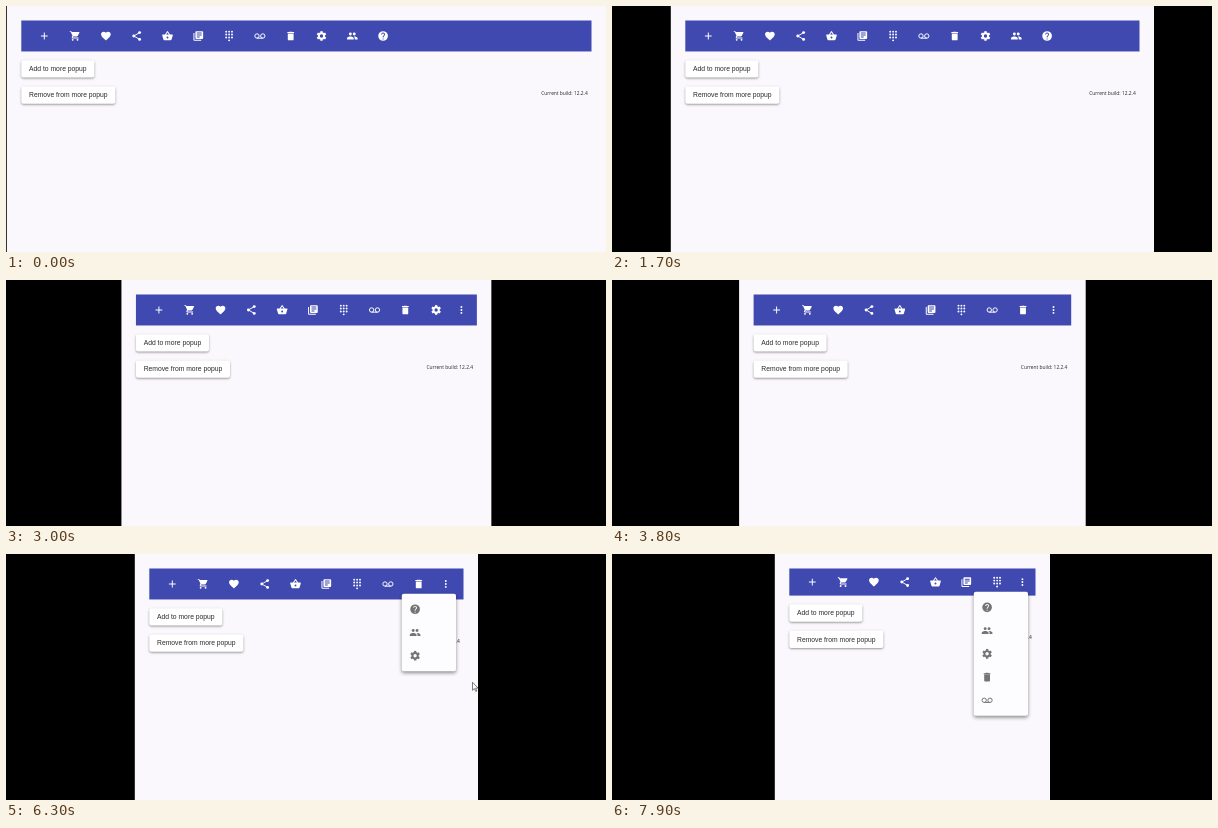
An HTML page with a canvas for the animation above (8000 ms loop, 600 px wide and 246 px high).

```html
<!DOCTYPE html>
<html lang="en">
<head>
<meta charset="utf-8">
<title>Responsive toolbar</title>
<style>
html, body { margin: 0; width: 600px; height: 246px; overflow: hidden; background: #000; }
canvas { display: block; width: 600px; height: 246px; }
</style>
</head>
<body>
<canvas id="stage"></canvas>
<script>
const W = 600, H = 246, LOOP = 8000, STEP = 100;
const S = 0.484;            // CSS pixel to stage pixel
const GAP = 30.8;           // distance between toolbar icons
const dpr = window.devicePixelRatio || 1;
const canvas = document.getElementById('stage');
canvas.width = W * dpr;
canvas.height = H * dpr;
const ctx = canvas.getContext('2d');

// time, inset of the window on each side
const INSET = [[800, 0], [1700, 58], [2500, 105], [2600, 106.5], [3200, 118.7], [3500, 118.7],
  [3800, 126.3], [4000, 128], [6900, 128], [7200, 138.4], [7800, 156.5], [7900, 162]];
// time, pointer tip
const POINTER_X = [[4200, 463], [4700, 439], [5100, 437.5], [6000, 465], [6300, 466.5], [6500, 472]];
const POINTER_Y = [[4200, 118], [4700, 33], [5100, 31.5], [6000, 128], [6500, 128.5]];

function track(keys, t) {
  if (t <= keys[0][0]) return keys[0][1];
  for (let i = 1; i < keys.length; i++) {
    const [t0, a] = keys[i - 1], [t1, b] = keys[i];
    if (t <= t1) return a + (b - a) * (t - t0) / (t1 - t0);
  }
  return keys[keys.length - 1][1];
}

const path = d => {
  const p = new Path2D(d);
  return () => ctx.fill(p, 'evenodd');
};

function dot(x, y, r) {
  ctx.beginPath();
  ctx.arc(x, y, r, 0, Math.PI * 2);
  ctx.fill();
}

function ring(x, y, r, width) {
  ctx.lineWidth = width;
  ctx.beginPath();
  ctx.arc(x, y, r, 0, Math.PI * 2);
  ctx.stroke();
}

// Icons live on a 24 x 24 grid.
const add = path('M19 13h-6v6h-2v-6H5v-2h6V5h2v6h6z');
const heart = path('M12 21.3 10.5 20C5.4 15.4 2 12.3 2 8.5 2 5.4 4.4 3 7.5 3 9.2 3 10.9 3.8 12 5.1 13.1 3.8 14.8 3 16.5 3 19.6 3 22 5.4 22 8.5c0 3.8-3.4 6.9-8.5 11.5z');
const basket = path('M17.2 9 12.8 2.4q-.8-.9-1.6 0L6.8 9H2q-1.2.1-1 1.3l2.6 9.2Q4 21 5.5 21h13q1.5 0 1.9-1.5L23 10.3Q23.2 9.1 22 9zM9 9l3-4.4L15 9zM12 13a2 2 0 1 0 0 4 2 2 0 0 0 0-4z');
const books = path('M4 6H2v14q0 2 2 2h14v-2H4zM20 2H8Q6 2 6 4v12q0 2 2 2h12q2 0 2-2V4q0-2-2-2zM19 11H9V9h10zM15 15H9v-2h6zM19 7H9V5h10z');
const bin = path('M6 19q0 2 2 2h8q2 0 2-2V7H6zM19 4h-3.5l-1-1h-5l-1 1H5v2h14z');
const help = path('M12 2a10 10 0 1 0 0 20 10 10 0 0 0 0-20zM11 17h2v2h-2zM15.1 11.2l-.9.9C13.4 12.9 13 13.5 13 15h-2v-.5q0-1.6 1.2-2.8l1.2-1.3Q14 9.8 14 9a2 2 0 0 0-4 0H8a4 4 0 0 1 8 0q0 1.3-.9 2.2z');
const cartBody = path('M1 2v2h2l3.6 7.6-1.4 2.4C4.5 15.4 5.5 17 7 17h12v-2H7.4l-.2-.4.9-1.6h7.5q1.2 0 1.7-1L20.9 5.5Q21.4 4.2 20 4H5.2l-.9-2z');
const people = path('M8 13c-2.3 0-7 1.2-7 3.5V19h14v-2.5C15 14.2 10.3 13 8 13zM16 13l-1 .1q2 1.3 2 3.4V19h6v-2.5C23 14.2 18.3 13 16 13z');

function cart() {
  cartBody();
  dot(7, 20, 2);
  dot(17, 20, 2);
}

function share() {
  ctx.lineWidth = 2;
  ctx.beginPath();
  ctx.moveTo(18, 5);
  ctx.lineTo(6, 12);
  ctx.lineTo(18, 19);
  ctx.stroke();
  dot(18, 5, 3);
  dot(6, 12, 3);
  dot(18, 19, 3);
}

function dialpad() {
  for (let i = 0; i < 9; i++) dot(6 + 6 * (i % 3), 3 + 6 * Math.floor(i / 3), 2);
  dot(12, 21, 2);
}

function voicemail() {
  ring(6, 12, 4.5, 2);
  ring(18, 12, 4.5, 2);
  ctx.fillRect(6, 15.5, 12, 2);
}

function gear() {
  ring(12, 12, 5.5, 4);
  ctx.translate(12, 12);
  for (let i = 0; i < 6; i++) {
    ctx.fillRect(-2.4, -10, 4.8, 4);
    ctx.rotate(Math.PI / 3);
  }
}

function group() {
  dot(8, 8, 3);
  dot(16, 8, 3);
  people();
}

function more() {
  for (const y of [6, 12, 18]) dot(12, y, 2);
}

const ICONS = [add, cart, heart, share, basket, books, dialpad, voicemail, bin, gear, group, help];

function icon(draw, x, y, color) {
  ctx.save();
  ctx.translate(x, y);
  ctx.scale(S, S);
  ctx.translate(-12, -12);
  ctx.fillStyle = ctx.strokeStyle = color;
  draw();
  ctx.restore();
}

function card(x, y, w, h, r, color, lift, alpha) {
  ctx.save();
  ctx.shadowColor = `rgba(0,0,0,${alpha})`;
  ctx.shadowOffsetY = lift * dpr;
  ctx.shadowBlur = lift * 2.2 * dpr;
  ctx.fillStyle = color;
  ctx.beginPath();
  ctx.roundRect(x, y, w, h, r);
  ctx.fill();
  ctx.restore();
}

function button(label, x, y) {
  ctx.font = `${14 * S}px "Liberation Sans", Arial, sans-serif`;
  card(x, y, ctx.measureText(label).width + 32 * S, 36 * S, 2, '#fff', 1, 0.4);
  ctx.fillStyle = '#2b2b2b';
  ctx.fillText(label, x + 16 * S, y + 11.1);
}

// Where the toolbar sits at time t
function bar(t) {
  const inset = track(INSET, t);
  const left = inset + 15.3, right = W - 14.5 - inset;
  return { inset, left, right, width: right - left };
}

// The overflow check trails the resize a little.
function countVisible(t) {
  const room = bar(t - 200).width - 66;
  return Math.min(ICONS.length, Math.floor(room / GAP) + 1);
}

function menu(hidden, x, y, alpha) {
  ctx.save();
  ctx.globalAlpha = alpha;
  card(x, y, 112 * S, (hidden.length * 48 + 16) * S, 2, '#fdfcfe', 1.8, 0.45);
  hidden.forEach((draw, i) => icon(draw, x + 13.3, y + (32 + 48 * i) * S, '#747474'));
  ctx.restore();
}

const ARROW = new Path2D('M0 0V16.5L4 13 6.7 19 9 18 6.4 12H11.5z');
const HAND = new Path2D('M4 1.5Q5.5-.5 7 1.5V8L15 10Q17 11 16 15L14 21H6L1 14Q-1 11 1.500 11L4 13z');

function pointer(t) {
  if (t < 4300 || t > 6500) return;
  const hand = t >= 4700 && t <= 5200;
  ctx.save();
  ctx.translate(track(POINTER_X, t), track(POINTER_Y, t));
  if (hand) ctx.translate(-2.5, 0);
  ctx.scale(S, S);
  ctx.fillStyle = '#fff';
  ctx.strokeStyle = '#222';
  ctx.lineWidth = 1.2;
  const shape = hand ? HAND : ARROW;
  ctx.fill(shape);
  ctx.stroke(shape);
  ctx.restore();
}

function draw(t) {
  const { inset, left, right, width } = bar(t);
  const narrow = W - 2 * inset < 600 * S;
  const top = 14.5, height = (narrow ? 56 : 64) * S;
  const bottom = top + height, mid = top + height / 2;
  const visible = countVisible(t);

  ctx.setTransform(dpr, 0, 0, dpr, 0, 0);
  ctx.fillStyle = '#000';
  ctx.fillRect(0, 0, W, H);
  ctx.save();
  ctx.beginPath();
  ctx.rect(inset + 0.8, 0, W - 2 * inset - 0.8, H);
  ctx.clip();
  ctx.fillStyle = '#faf8fc';
  ctx.fillRect(0, 0, W, H);

  ctx.fillStyle = '#3f49b0';
  ctx.fillRect(left, top, width, height);
  for (let i = 0; i < visible; i++) icon(ICONS[i], left + 23 + GAP * i, mid, '#fff');
  if (visible < ICONS.length) {
    const moreX = Math.max(right - 17.7, left + 23 + GAP * (visible - 1) + 25.3);
    if (t >= 4800 && t <= 5000) {
      ctx.fillStyle = 'rgba(255,255,255,.12)';
      dot(moreX, mid, 20 * S);
    }
    icon(more, moreX, mid, '#fff');
  }

  button('Add to more popup', left, bottom + 8.7);
  button('Remove from more popup', left, bottom + 34.9);
  ctx.font = '4.9px "Open Sans", "Noto Sans", sans-serif';
  ctx.fillStyle = '#222';
  ctx.textAlign = 'right';
  ctx.fillText('Current build: 12.2.4', right - 3.8, bottom + 43.4);
  ctx.textAlign = 'left';

  if (t >= 4900) {
    const hidden = ICONS.slice(visible).reverse();
    menu(hidden, right - 61.7, mid + 9.8, Math.min(1, (t - 4800) / 150));
  }
  pointer(t);
  ctx.restore();
}

const start = performance.now();
function tick() {
  const t = (performance.now() - start) % LOOP;
  draw(Math.floor(t / STEP) * STEP);
  requestAnimationFrame(tick);
}
tick();
</script>
</body>
</html>
```
